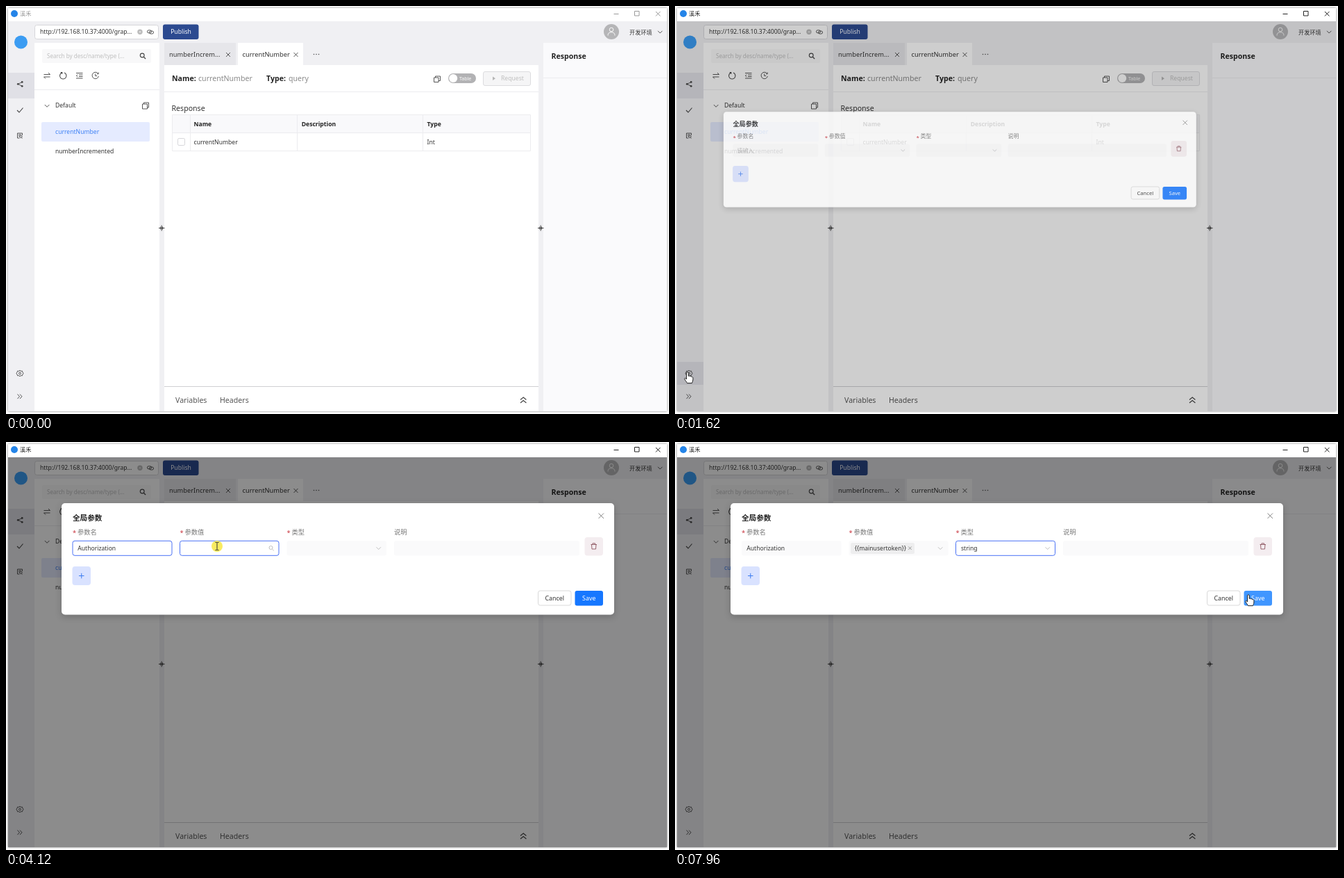
These frames come from a looping animation (955x587 px, 8000 ms). An HTML page:

```html
<!DOCTYPE html>
<html lang="zh">
<head>
<meta charset="utf-8">
<title>Global parameters</title>
<style>
  html, body { margin: 0; height: 100%; overflow: hidden; background: #fff; }
  svg { display: block; width: 100vw; height: 100vh; }
  text { font: 8.6px "Noto Sans", "Noto Sans CJK SC", "Noto Sans CJK", sans-serif; fill: #333; }
  .m { font-size: 9.3px; }
  .l { font-size: 10.6px; }
  .b { font-weight: 600; fill: #222; }
  .g { fill: #8a8a8a; }
  .p { fill: #bfbfbf; }
  .c { text-anchor: middle; }
  .cjk { font-size: 9.3px; fill: #777; }
  .i { fill: none; stroke: #444; stroke-width: .9; }
  .line { fill: none; stroke: #ececef; }
  .field { fill: #fafafb; stroke: none; }
  .focus { fill: #fff; stroke: #4a72f5; }
  .panel { fill: #fff; filter: drop-shadow(0 2px 4px #0003); }
</style>
</head>
<body>
<svg viewBox="0 0 955 587">
  <rect x="3" y="3" width="949" height="580" fill="#f0f0f3" style="filter:drop-shadow(0 0 1.5px #777)"/>

  <!-- title bar -->
  <path d="M3 3H952V22H3Z" fill="#fff"/>
  <circle cx="12" cy="11" r="5" fill="#2484e8"/>
  <g id="title">
    <text x="20" y="14.2" style="font-size:8.2px;fill:inherit">溪禾</text>
    <path d="M875.500 11.500H882.500M905.500 7.500h6.500v6.500h-6.500ZM936 8l6.500 6.500M942.500 8l-6.500 6.500" fill="none" stroke="currentColor"/>
  </g>

  <!-- side bar -->
  <circle cx="21.500" cy="52" r="9.500" fill="#3b9cf2"/>
  <path d="M3 96H41V133H3Z" fill="#e0e0e6"/>
  <path id="gearBg" d="M3 512H41V545H3Z" fill="#e0e0e6"/>
  <g class="i">
    <path d="M23 109.500L17.500 112.300 23 115.200"/>
    <path d="M16 150l3 3 5.500-6.500" stroke-width="1.100"/>
    <path d="M23.500 186v-3h-7v7h3M18 185h4M18 187h2M23.500 190.500l-1.200-1.200"/>
    <circle cx="21.500" cy="188" r="1.600"/>
    <path d="M20 524l1.300 1.300 2-.2.700 1.800 1 1.600-1 1.600-.7 1.800-2-.2-1.300 1.300-1.300-1.300-2 .2-.7-1.800-1-1.600 1-1.600.700-1.800 2 .2Z"/>
    <circle cx="20" cy="528.500" r="1.500"/>
    <path d="M16.500 558.500l3 3.300-3 3.300M20 558.500l3 3.300-3 3.300"/>
  </g>
  <g fill="#444"><circle cx="23.200" cy="109.400" r="1.400"/><circle cx="17.300" cy="112.300" r="1.400"/><circle cx="23.200" cy="115.300" r="1.400"/></g>

  <!-- header -->
  <rect x="41.500" y="27.500" width="178" height="20" rx="3" fill="#fff" stroke="#d6d6da"/>
  <text x="49" y="40.300">http://192.168.10.37:4000/grap...</text>
  <circle cx="193" cy="37.300" r="3.700" fill="#bbb"/>
  <path d="M191.800 36.100l2.400 2.400M194.200 36.100l-2.400 2.400" stroke="#fff" stroke-width=".7"/>
  <g class="i"><rect x="203.500" y="34.800" width="6" height="4" rx="2"/><rect x="206.500" y="36" width="6" height="4" rx="2"/></g>
  <rect x="226" y="26.500" width="51.500" height="21.500" rx="3" fill="#2c4a90"/>
  <text class="c" x="252" y="40.300" style="fill:#fff">Publish</text>
  <circle cx="872" cy="37" r="11" fill="#b5b5b7"/>
  <g class="i" style="stroke:#fff"><circle cx="872" cy="34" r="2.800"/><path d="M867 42.500q0-4.800 5-4.800t5 4.800"/></g>
  <text x="898" y="41" style="font-size:8.200px">开发环境</text>
  <path class="i" d="M939 35.800l3.200 3.200 3.200-3.200"/>

  <!-- operations panel -->
  <path d="M41 53H221V583H41Z" fill="#fff"/>
  <rect x="52" y="62" width="157" height="20" rx="2" fill="#f8f8f9"/>
  <text class="p" x="59" y="75" style="font-size:8.100px">Search by desc/name/type (...</text>
  <g class="i">
    <circle cx="196.200" cy="71" r="2.900" stroke-width="1.100"/><path d="M198.300 73.200l2.800 2.800" stroke-width="1.300"/>
    <path d="M54.500 98.500h9l-2.500-2.500M63.500 102h-9l2.500 2.500"/>
    <path d="M80.500 96a4.700 4.700 0 1 0 3.500 0M80.800 97.800v-2.200h-2" stroke-width="1.100"/>
    <path d="M101 96.500h9.500M105 99h5.500M105 101.500h5.500M101 104h9.500M103.300 98.500l-2 1.700 2 1.700"/>
    <path d="M132.700 97.300a4.700 4.700 0 1 0 .7 3.700M128.700 97.500v3h2.500M133.200 95.500v2.200h-2.200"/>
    <path d="M55.800 142l3.300 3.300 3.300-3.300"/>
    <path d="M196.500 141h7v7h-7ZM198.500 141v-2h7v7h-2"/>
  </g>
  <path class="line" d="M41 120.500H221"/>
  <text x="71" y="146.400">Default</text>
  <rect x="51" y="167" width="156" height="28" rx="2" fill="#e5ebff"/>
  <text x="71" y="184" style="fill:#3f82f5">currentNumber</text>
  <text x="71" y="212">numberIncremented</text>

  <!-- main panel -->
  <path d="M228 85H767V583H228Z" fill="#fff"/>
  <path d="M228 53H331V85H228Z" fill="#e6e6ea"/>
  <path d="M334 53H428V86H334Z" fill="#fff"/>
  <text class="m" x="235" y="73">numberIncrem...</text>
  <text class="m" x="340.500" y="73">currentNumber</text>
  <path class="i" d="M317 67l6 6M323 67l-6 6M414.500 67l6 6M420.500 67l-6 6"/>
  <g fill="#555"><circle cx="443.500" cy="69.500" r=".8"/><circle cx="447" cy="69.500" r=".8"/><circle cx="450.500" cy="69.500" r=".8"/></g>
  <text class="l b" x="239" y="108">Name:</text><text class="l g" x="277" y="108">currentNumber</text>
  <text class="l b" x="375" y="108">Type:</text><text class="l g" x="407" y="108">query</text>
  <path class="i" d="M616.500 103h6.500v6.500h-6.500ZM618.500 103v-2h7v6.500h-2.500"/>
  <rect x="637" y="97" width="40" height="14" rx="7" fill="#b2b2b4"/>
  <circle cx="644.200" cy="104" r="6" fill="#fff"/>
  <text x="653" y="107" style="font-size:7px;fill:#fff">Table</text>
  <rect x="687.500" y="94.500" width="68" height="20" rx="2.500" fill="#f5f5f6" stroke="#dcdcdf"/>
  <path d="M701 101.500l4 2.700-4 2.700Z" fill="#b5b5b5"/>
  <text class="p" x="713" y="107.400">Request</text>
  <path class="line" d="M228 123.500H767"/>
  <text class="l" x="238.500" y="150.800">Response</text>
  <path d="M239 156.500H755.500V182H239Z" fill="#f9f9fb"/>
  <path class="line" d="M239.500 156.500H755.500V208.500H239.500ZM239 182.500H755.500M265.500 156V208M419.500 156V208M600.500 156V208"/>
  <text class="b" x="270.500" y="172.800">Name</text><text class="b" x="425.700" y="172.800">Description</text><text class="b" x="606.500" y="172.800">Type</text>
  <rect x="247.500" y="190.500" width="10" height="10" rx="1.800" fill="#fff" stroke="#d6d6da"/>
  <text x="270.500" y="198.600">currentNumber</text><text x="606.500" y="198.600">Int</text>
  <path d="M228 547.500H767" stroke="#cfcfd2"/>
  <text class="l" x="244" y="571.300" style="fill:#555">Variables</text><text class="l" x="308" y="571.300" style="fill:#555">Headers</text>
  <path class="i" d="M741 566.500l4.200-3.500 4.200 3.500M741 571l4.200-3.500 4.200 3.500" style="stroke-width:1.200"/>

  <!-- response panel -->
  <path d="M774 53H952V583H774Z" fill="#fafafc"/>
  <path class="line" d="M774 103.500H952"/>
  <text class="l b" x="785.500" y="75.800">Response</text>
  <g class="i"><path id="grip" d="M220 319.500h8.500M224.200 315.500v8M222.800 317.500v4M225.600 317.500v4" stroke-width="1"/><use href="#grip" x="546"/></g>

  <path id="scrim" d="M3 22H952V583H3Z"/>

  <g id="modal">
    <rect x="80" y="88" width="796" height="160.500" rx="5" fill="#fff" style="filter:drop-shadow(0 3px 5px #0003)"/>
    <text class="l b" x="96" y="112.700">全局参数</text>
    <path class="i" d="M853.500 102.500l7.500 7.500M861 102.500l-7.500 7.500" style="stroke:#777"/>
    <g id="labels"></g>
    <g id="fields"></g>
    <text id="hint" class="p" x="103" y="156.300" style="font-size:9.300px">请输入</text>
    <text id="name" x="103.300" y="156">Authorization</text>
    <g id="tag">
      <rect x="253" y="145" width="92" height="16" rx="2.500" fill="#eeeeef"/>
      <text x="258.700" y="156">{{mainusertoken}}</text>
      <path class="i" d="M336.300 150.500l4.400 4.400M340.700 150.500l-4.400 4.400" style="stroke:#888"/>
    </g>
    <text id="type" x="412" y="156">string</text>
    <g class="i" style="stroke:#b8b8b8">
      <path id="arrow2" d="M379 151.300l3.200 3.200 3.200-3.200"/>
      <g id="lens"><circle cx="381.500" cy="152" r="2.500"/><path d="M383.400 154l2.400 2.400"/></g>
      <path d="M533.500 151.300l3.200 3.200 3.200-3.200"/>
    </g>
    <rect x="833.500" y="137" width="26.500" height="26.500" rx="4" fill="#f4edf0"/>
    <path class="i" d="M842.500 147.500h8.500M845 147.500v-1.700h3.500v1.700M843.500 147.500l.5 6.500h5.500l.5-6.500" style="stroke:#8d5560"/>
    <rect x="95.500" y="179" width="26.500" height="27" rx="4" fill="#d9e2ff"/>
    <path d="M105 192.500h7.500M108.750 188.800v7.500" stroke="#3b7bf0"/>
    <rect x="766.500" y="214" width="47.500" height="21" rx="3" fill="#fff" stroke="#d9d9d9"/>
    <text class="c" x="790.200" y="227.700" style="font-size:8.900px">Cancel</text>
    <rect id="save" x="819.500" y="214" width="40.500" height="21.500" rx="3"/>
    <text class="c" x="839.800" y="227.700" style="font-size:8.900px;fill:#fff">Save</text>
  </g>

  <g id="drop2"></g>
  <g id="drop3"></g>

  <g id="cursor">
    <circle id="flash" r="8" fill="#f7e63a" opacity=".8"/>
    <path id="point" d="M0 0V11.200L2.600 8.800 4.300 12.600 6 11.900 4.400 8.200H8Z" fill="#fff" stroke="#222" stroke-width=".8"/>
    <path id="hand" d="M-1.500.9C-1.500-.6 1.200-.6 1.200.9V5.500C1.800 4.700 3.400 4.900 3.600 6 4.400 5.300 5.700 5.700 5.900 6.800 6.900 6.300 7.900 7 7.900 8.200V11C7.900 13 6.600 14 6.400 15.600H-.6C-1 14-3.600 11.300-4.300 9.600-4.600 8.400-3.200 8-2.400 8.900L-1.500 10Z" fill="#fff" stroke="#222" stroke-width="1"/>
    <path id="beam" d="M-2.500-5.500h2l.5.500.5-.5h2M0-5V5M-2.500 5.500h2l.5-.5.5.5h2" fill="none" stroke="#333"/>
  </g>
</svg>
<script>
const $ = id => document.getElementById(id);
const clamp = v => Math.min(1, Math.max(0, v));
const show = (id, on) => $(id).style.display = on ? '' : 'none';

const box = (cls, x, y, w, h, r, extra = '') =>
  `<rect class="${cls}" x="${x}" y="${y}" width="${w}" height="${h}" rx="${r}" ${extra}/>`;

const columns = [[96, 143.5, '参数名'], [250.5, 143, '参数值'], [404.5, 143.5, '类型'], [559, 267, '说明']];
columns.forEach(([x, w, label], i) => {
  const star = i < 3;
  $('labels').innerHTML += (star ? `<text class="m" x="${x}" y="134" style="fill:#c8323c">*</text>` : '') +
    `<text class="cjk" x="${star ? x + 7 : x}" y="132.700">${label}</text>`;
  $('fields').innerHTML += box('field', x, 142, w, 21.5, 3) +
    (star ? box('focus', x, 142.3, w - .5, 21, 3, `id="focus${i + 1}"`) : '');
});

function fillMenu(id, x, rows, extra = '') {
  const pitch = 21.3, top = 166.3;
  $(id).innerHTML = box('panel', x, top, 144, rows.length * pitch + 5.2, 5) +
    box('', x + 2.7, top + 2.7, 138.6, pitch, 2.5, `fill="#f4f4f4" id="${id}Row"`) + extra +
    rows.map((s, i) => `<text x="${x + 10.7}" y="${top + 16.6 + i * pitch}">${s}</text>`).join('');
}
fillMenu('drop2', 250, ['baseUrl', 'mainusertoken', 'testtoken', 'pageSize', 'userId', 'version', 'locale'],
  '<g id="picked">' + box('', 252.7, 190.3, 138.6, 21.3, 2.5, 'fill="#e6f1ff"') +
  '<path class="i" d="M380 201l2.300 2.300 4-4.600" style="stroke:#1677ff"/></g>');
fillMenu('drop3', 404, ['string', 'number', 'boolean']);

// time, x, y of the pointer tip, and its shape from then on
const path = [
  [390, 912, 572, 'point'], [660, 470, 416, 'point'], [1080, 34, 520, 'hand'], [1150, 24, 530, 'hand'],
  [1480, 13, 534, 'hand'], [1620, 18, 527, 'hand'], [1740, 31, 510, 'point'], [1760, 31, 510, 'point'],
  [2090, 340, 184, 'point'], [2430, 235, 162, 'beam'], [2640, 170, 153, 'beam'], [3570, 170, 153, 'beam'],
  [4050, 304, 150, 'beam'], [4400, 304, 150, 'hand'], [4880, 300, 200, 'hand'], [5230, 300, 200, 'hand'],
  [5980, 457, 156, 'hand'], [6400, 457, 156, 'hand'], [6740, 440, 179, 'hand'], [6870, 440, 179, 'point'],
  [7540, 815, 221, 'hand'], [7630, 824, 221, 'hand'], [7700, 826, 220, 'hand'], [8000, 826, 220, 'hand']
];
const clicks = [2640, 4110, 5090, 6100, 6790];

function bezier(x1, y1, x2, y2, p) {
  const at = (a, b, s) => 3 * a * s * (1 - s) ** 2 + 3 * b * s * s * (1 - s) + s ** 3;
  let lo = 0, hi = 1;
  for (let i = 0; i < 20; i++) {
    const mid = (lo + hi) / 2;
    if (at(x1, x2, mid) < p) lo = mid; else hi = mid;
  }
  return at(y1, y2, lo);
}

// rises after `from`, falls after `to`
const fade = (t, from, to, ms = 200) => clamp((t - from) / ms) * (1 - clamp((t - to) / ms));

function menu(id, t, from, to) {
  const k = 1 - (1 - fade(t, from, to)) ** 3, s = .8 + .2 * k;
  $(id).setAttribute('opacity', k);
  $(id).setAttribute('transform', `translate(0 ${166.3 * (1 - s)}) scale(1 ${s})`);
  show(id, k > 0);
}

function moveCursor(t) {
  show('cursor', t >= path[0][0]);
  const i = Math.max(0, path.findLastIndex(k => k[0] <= t));
  const a = path[i], b = path[i + 1] || a;
  const p = clamp((t - a[0]) / (b[0] - a[0] || 1)), e = p * p * (3 - 2 * p);
  $('cursor').setAttribute('transform', `translate(${a[1] + (b[1] - a[1]) * e} ${a[2] + (b[2] - a[2]) * e})`);
  for (const id of ['point', 'hand', 'beam']) show(id, id === a[3]);
  show('flash', clicks.some(c => t >= c && t < c + 80));
}

function draw(t) {
  const active = t >= 1450;
  $('title').style.cssText = active ? 'fill:#222;color:#222' : 'fill:#999;color:#999';
  show('gearBg', t >= 1080 && t < 1810);

  $('scrim').setAttribute('opacity', .45 * clamp((t - 1535) / 200));
  const zoom = bezier(.08, .82, .17, 1, clamp((t - 1552) / 300)), s = .2 + .8 * zoom;
  show('modal', t > 1552);
  $('modal').setAttribute('opacity', zoom);
  $('modal').setAttribute('transform', `translate(${10 * (1 - s)} ${532 * (1 - s)}) scale(${s})`);

  $('focus1').setAttribute('opacity', fade(t, 2600, 4140));
  $('focus2').setAttribute('opacity', fade(t, 3900, 6100));
  $('focus3').setAttribute('opacity', fade(t, 6080, 9000));
  show('hint', t < 3180);
  show('name', t >= 3180);
  show('tag', t >= 5130);
  show('type', t >= 6850);
  const open = t >= 4050 && t < 6100;
  show('lens', open);
  show('arrow2', !open);
  $('save').setAttribute('fill', t >= 7550 ? '#4096ff' : '#1677ff');

  menu('drop2', t, 4190, 6080);
  $('drop2Row').setAttribute('y', t < 4740 ? 169 : 190.3);
  show('picked', t >= 5130);
  menu('drop3', t, 6110, 6840);
  moveCursor(t);
}

const start = performance.now();
function tick() {
  draw((performance.now() - start) % 8000);
  requestAnimationFrame(tick);
}
tick();
</script>
</body>
</html>
```
